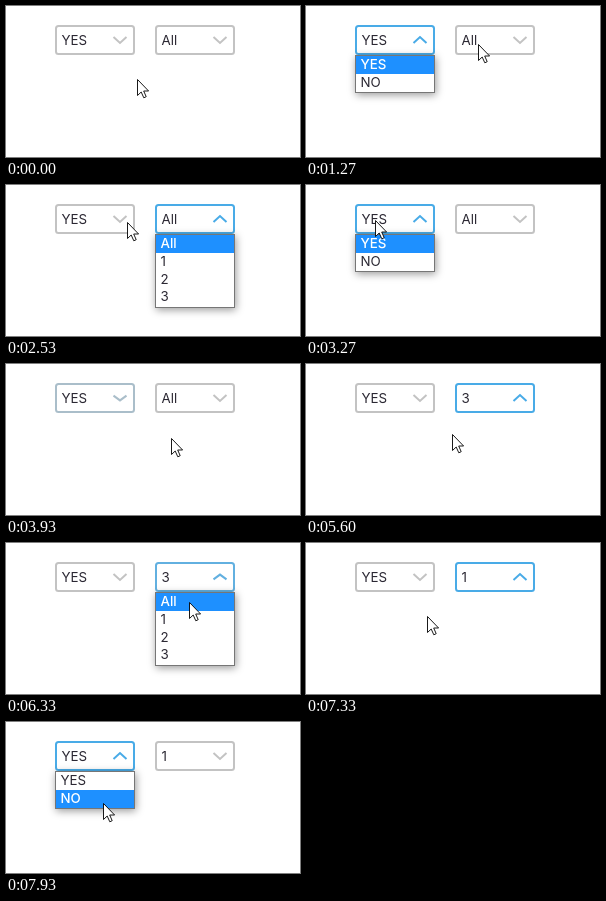
Write an HTML page with a canvas that moves like this. It is 294 px wide and 151 px high and loops after 8000 ms.

```html
<!DOCTYPE html>
<html lang="en">
<head>
<meta charset="utf-8">
<style>
html, body { margin: 0; height: 100%; overflow: hidden; background: #fff; }
canvas { display: block; }
</style>
</head>
<body>
<canvas width="294" height="151"></canvas>
<script>
const ctx = document.querySelector('canvas').getContext('2d');
const FPS = 15, LOOP = 8000;
const TRAVEL = 4, PRESS_DELAY = 2, FADE = 4; // in ticks of 1/15 s
const ROW = 17.8, TOP = 19, LIST_TOP = 50, WIDTH = 80;
const GRAY = [195, 195, 195], BLUE = [73, 171, 231], INK = '#2b2833';

const selects = [
  { x: 49, options: ['YES', 'NO'] },
  { x: 149, options: ['All', '1', '2', '3'] },
];

// Pointer script: where it arrives and when, with or without a press
const hover = (at, x, y) => ({ at, x, y });
const press = (at, x, y) => ({ at, x, y, pressAt: at + PRESS_DELAY });
const start = { x: 131, y: 73 };
const stops = [
  press(4, 96, 38),
  press(19, 172, 38),
  press(40, 69, 35),
  press(49, 69, 35),
  press(55, 135, 109),
  press(61, 195, 38),
  hover(67, 186, 86),
  press(76, 186, 107),
  press(84, 146, 70),
  press(91, 183, 38),
  hover(97, 183, 80),
  press(102, 183, 80),
  hover(108, 126, 80),
  press(113, 92, 36),
  hover(119, 97, 81),
];

const clamp = p => Math.min(1, Math.max(0, p));
const mix = (a, b, p) => a + (b - a) * p;
const smooth = p => p * p * (3 - 2 * p);
const easeOut = p => 1 - (1 - p) ** 2.3;
const rowTop = i => LIST_TOP + Math.round(i * ROW);
const within = (s, x) => x > s.x && x < s.x + WIDTH;

function rowAt(s, { x, y }) {
  const row = Math.floor((y - LIST_TOP) / ROW);
  return within(s, x) && s.options[row] ? row : -1;
}

// What a press does: pick an option, toggle a field, or blur
function afterPress(state, stop) {
  const { open, focus, values } = state, t = stop.pressAt;
  const row = open < 0 ? -1 : rowAt(selects[open], stop);
  if (row >= 0) return { t, focus, open: -1, values: values.with(open, row) };
  const hit = stop.y < LIST_TOP ? selects.findIndex(s => within(s, stop.x)) : -1;
  return { t, focus: hit, open: hit === open ? -1 : hit, values };
}

const states = [{ t: 0, focus: -1, open: -1, values: [0, 0] }];
for (const stop of stops) {
  if (stop.pressAt) states.push(afterPress(states.at(-1), stop));
}

function pointerAt(n) {
  let { x, y } = start;
  for (const stop of stops) {
    const p = smooth(clamp((n - stop.at) / TRAVEL + 1));
    x = mix(x, stop.x, p);
    y = mix(y, stop.y, p);
  }
  return { x: Math.round(x), y: Math.round(y) };
}

// 0 = blurred, 1 = focused
function focusLevel(index, n) {
  return states.reduce((level, state) =>
    mix(level, +(state.focus === index), easeOut(clamp((n - state.t) / FADE))), 0);
}

function text(label, x, y, color, weight = 400) {
  ctx.font = `${weight} 13.33px Inter, sans-serif`;
  ctx.fillStyle = color;
  ctx.fillText(label, x, y);
}

function drawField({ x, options }, value, level) {
  ctx.strokeStyle = `rgb(${GRAY.map((c, i) => Math.round(mix(c, BLUE[i], level)))})`;
  ctx.lineWidth = 2;
  ctx.beginPath();
  ctx.roundRect(x + 1, TOP + 1, WIDTH - 2, 28, 2.5);
  ctx.stroke();
  const h = 3 * Math.cos(Math.PI * level);
  ctx.beginPath();
  ctx.moveTo(x + 58.5, 34 - h);
  ctx.lineTo(x + 65, 34 + h);
  ctx.lineTo(x + 71.5, 34 - h);
  ctx.stroke();
  text(options[value], x + 6.5, 39, INK);
}

function drawList(s, value, pointer) {
  const height = s.options.length * 18;
  ctx.save();
  ctx.shadowColor = 'rgba(0,0,0,.4)';
  ctx.shadowBlur = 8;
  ctx.shadowOffsetX = 1;
  ctx.shadowOffsetY = 2;
  ctx.fillStyle = '#767676';
  ctx.fillRect(s.x, LIST_TOP - 1, WIDTH, height + 2);
  ctx.restore();
  ctx.fillStyle = '#fff';
  ctx.fillRect(s.x + 1, LIST_TOP, WIDTH - 2, height);

  const row = rowAt(s, pointer);
  const active = row < 0 ? value : row;
  s.options.forEach((label, i) => {
    const y = rowTop(i), isActive = i === active;
    if (isActive) {
      ctx.fillStyle = '#1e90ff';
      ctx.fillRect(s.x + 1, y, WIDTH - 2, rowTop(i + 1) - y);
    }
    text(label, s.x + 5.5, y + 13, isActive ? '#fff' : INK, isActive ? 500 : 400);
  });
}

const arrow = new Path2D('M.5 .5V16.5L4.2 13 6.8 18.8 9.2 17.7 6.7 12H11.6Z');
function drawPointer({ x, y }) {
  ctx.save();
  ctx.translate(x, y);
  ctx.fillStyle = '#fff';
  ctx.strokeStyle = '#000';
  ctx.lineWidth = 0.9;
  ctx.fill(arrow);
  ctx.stroke(arrow);
  ctx.restore();
}

function draw() {
  // The small offset keeps rounded times on the right tick
  const n = Math.floor((performance.now() % LOOP) * FPS / 1000 + 0.1);
  const pointer = pointerAt(n);
  const { open, values } = states.findLast(state => state.t <= n);
  ctx.fillStyle = '#fff';
  ctx.fillRect(0, 0, 294, 151);
  selects.forEach((s, i) => drawField(s, values[i], focusLevel(i, n)));
  if (open >= 0) drawList(selects[open], values[open], pointer);
  drawPointer(pointer);
  requestAnimationFrame(draw);
}
draw();
</script>
</body>
</html>
```
